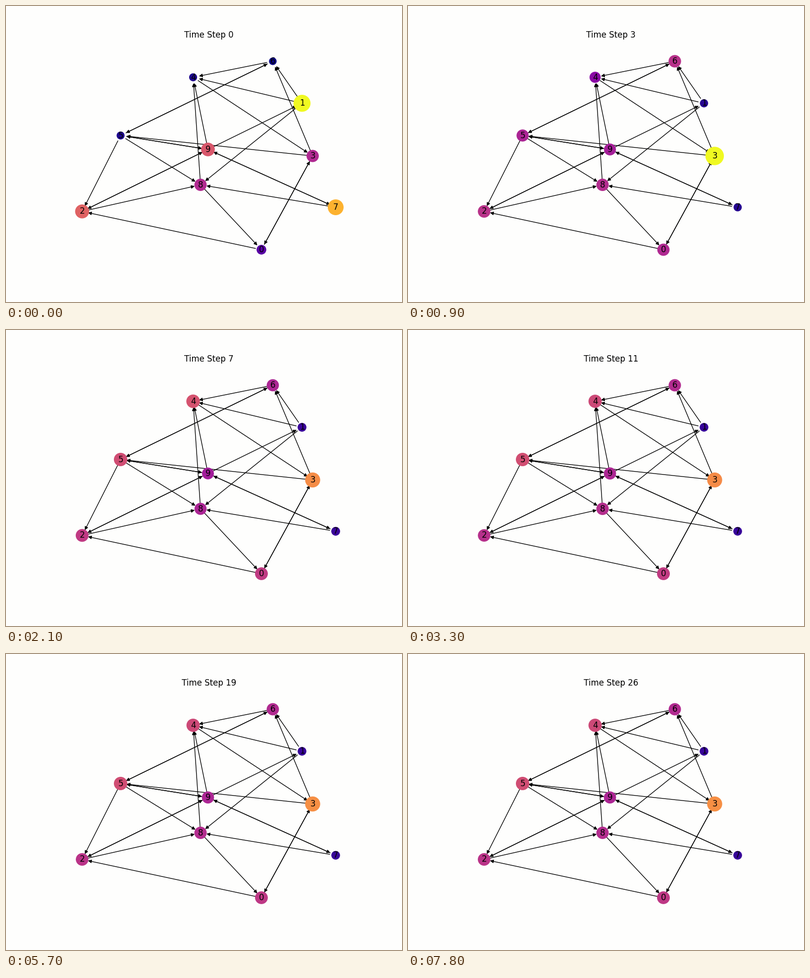
Recreate the animation shown at these times as a matplotlib script. Size 800 by 600 pixels, loop 8000 ms.

```python
import numpy as np
import matplotlib.pyplot as plt
from matplotlib.animation import FuncAnimation
from matplotlib.patches import FancyArrowPatch

plt.rcParams["font.family"] = "DejaVu Sans"

TICKS_PER_STEP = 3
SHRINK = np.sqrt(300) / 2  # points kept free around each node centre

# One key point and one string of successor digits per node.
POINTS = [
    (516, 494), (598, 197.2), (153.8, 416.4), (619.5, 304), (378, 144.5),
    (231.5, 262.5), (539, 112), (666, 408), (393, 362.5), (408, 290.8),
]
SUCCESSORS = "23 468 89 056 3 2689 45 89 04 12457".split()
EDGES = [(source, int(end))
         for source, ends in enumerate(SUCCESSORS) for end in ends]


def transition_matrix():
    matrix = np.zeros((len(POINTS), len(POINTS)))
    for source, end in EDGES:
        matrix[end, source] = 1 / len(SUCCESSORS[source])
    return matrix


def initial_weights():
    """Squares of random amplitudes, normalised to sum to one."""
    squares = np.random.RandomState(42).rand(len(POINTS)) ** 2
    return squares / squares.sum()


WALK = transition_matrix()
START = initial_weights()


def weights_at(step):
    """Random-walk distribution after the given number of steps."""
    return np.linalg.matrix_power(WALK, step) @ START


def node_colors(weights):
    return plt.get_cmap("plasma")(np.clip(weights / START.max(), 0, 1))


def node_sizes(weights):
    return 100 + 1850 * weights


fig = plt.figure(figsize=(8, 6), dpi=100, facecolor="#fefefd")
ax = fig.add_axes([0.125, 0.11, 0.775, 0.77])
ax.set_xlim(100, 720)
ax.set_ylim(534, 72)
ax.axis("off")
title = ax.set_title("", fontsize=12)

for source, end in EDGES:
    ax.add_patch(FancyArrowPatch(
        POINTS[source], POINTS[end], arrowstyle="-|>", mutation_scale=10,
        shrinkA=SHRINK, shrinkB=SHRINK, linewidth=1, color="black", zorder=1))

nodes = ax.scatter(*zip(*POINTS), s=node_sizes(START), c=node_colors(START),
                   linewidths=1, zorder=2)
for label, (x, y) in enumerate(POINTS):
    ax.text(x, y, str(label), fontsize=12, ha="center", va="center", zorder=3)


def draw(tick):
    step = tick // TICKS_PER_STEP
    weights = weights_at(step)
    nodes.set_sizes(node_sizes(weights))
    nodes.set_color(node_colors(weights))
    title.set_text(f"Time Step {step}")
    return nodes, title


animation = FuncAnimation(fig, draw, frames=80, interval=100,
                          repeat=True, repeat_delay=0)
plt.show()
```
